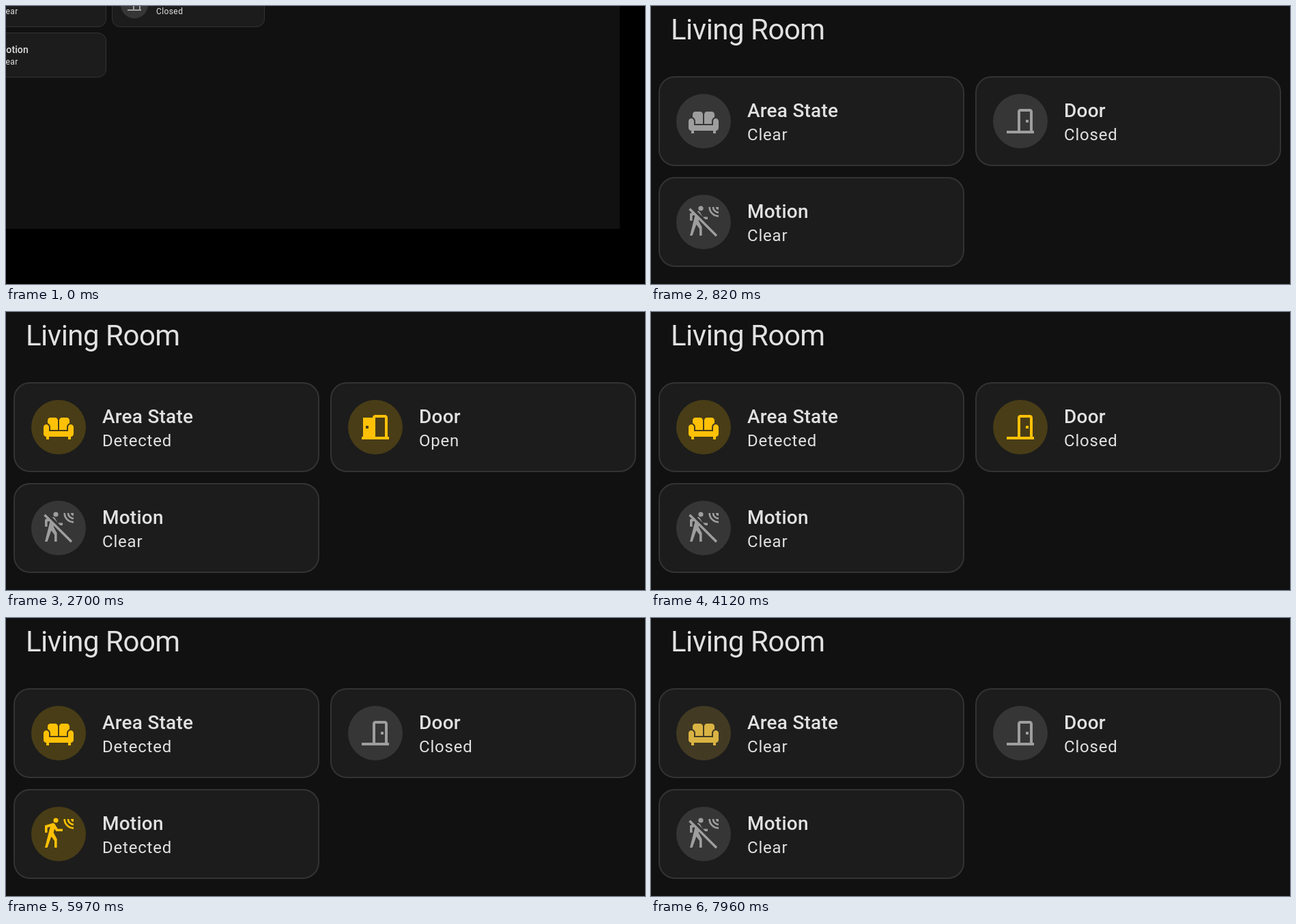
Animation of 936x408 px, one loop 8 s. Source, as an HTML page:

```html
<!DOCTYPE html>
<html lang="en">
<head>
<meta charset="utf-8">
<title>Living Room</title>
<style>
  html, body { margin: 0; width: 100%; height: 100%; overflow: hidden; background: #000; }
  svg { display: block; width: 936px; height: 408px; font-family: Roboto, Arial, sans-serif; }
  text { fill: #e1e1e1; }
  .title { font-size: 42px; letter-spacing: -0.012em; }
  .name { font-size: 28px; font-weight: 500; letter-spacing: .2px; }
  .state { font-size: 24px; letter-spacing: .8px; }
  .card { fill: #1c1c1c; stroke: #333; stroke-width: 2; }
</style>
</head>
<body>
<svg viewBox="0 0 936 408">
  <rect id="panel" fill="#111"/>
  <g id="page"><text class="title" x="29" y="49">Living Room</text></g>
</svg>
<script>
const LOOP = 8000, ZOOM_AT = 100, FADE = 180;
const GREY = [158, 158, 158], AMBER = [255, 193, 7];

const sofa = 'M12.5 7C12.5 5.89 13.39 5 14.5 5H18C19.1 5 20 5.9 20 7V9.16C18.84 9.57 18 10.67 18 11.97V14H12.5V7M6 11.96V14H11.5V7C11.5 5.89 10.61 5 9.5 5H6C4.9 5 4 5.9 4 7V9.15C5.16 9.56 6 10.67 6 11.96M20.66 10.03C19.68 10.19 19 11.12 19 12.12V15H5V12C5 10.9 4.11 10 3 10S1 10.9 1 12V17C1 18.1 1.9 19 3 19V21H5V19H19V21H21V19C22.1 19 23 18.1 23 17V12C23 10.79 21.91 9.82 20.66 10.03Z';
const doorClosed = 'M16 11H18V13H16V11M12 3H19C20.11 3 21 3.89 21 5V19H22V21H2V19H10V5C10 3.89 10.89 3 12 3M12 5V19H19V5H12Z';
const doorOpen = 'M12 3C10.89 3 10 3.89 10 5H3V19H2V21H22V19H21V5C21 3.89 20.11 3 19 3H12M12 5H19V19H12V5M5 11H7V13H5V11Z';
const headAndWaves = 'M10 .2A1.8 1.8 0 0 0 10 3.8A1.8 1.8 0 0 0 10 .2M15.67 1A7.33 7.33 0 0 0 23 8.33V7A6 6 0 0 1 17 1ZM18.33 1A4.67 4.67 0 0 0 23 5.67V4.33A3.33 3.33 0 0 1 19.67 1ZM21 1A2 2 0 0 0 23 3V1Z';
const walker = headAndWaves + 'M7.92 4.03C7.75 4.03 7.58 4.06 7.42 4.11L2 5.8V11H3.8V7.33L5.91 6.67L2 22H3.8L6.67 13.89L9 17V22H10.8V15.59L8.31 11.05L9.04 8.18L10.12 10H15V8.2H11.38L9.38 4.87C9.08 4.37 8.54 4.03 7.92 4.03Z';
const walkerOff = headAndWaves + 'M15 10V8.2H11.38L9.38 4.87C9.08 4.37 8.54 4.03 7.92 4.03C7.7 4.03 7.5 4.06 7.3 4.14L13.2 10ZM2.39 1.73L1.11 3L3.4 5.3L2 5.8V11H3.8V7.33L5 6.95L5.65 7.55L2 22H3.8L6.67 13.89L9 17V22H10.8V15.59L8.31 11.05L8.5 10.37L20.84 22.73L22.11 21.46Z';

// spans: [time switched on, time switched off]
const cards = [
  { x: 11, y: 103, name: 'Area State', labels: ['Clear', 'Detected'], icons: [sofa, sofa],
    spans: [[2520, 4240], [5790, 7890]] },
  { x: 475, y: 103, name: 'Door', labels: ['Closed', 'Open'], icons: [doorClosed, doorOpen],
    spans: [[2480, 4120]] },
  { x: 11, y: 251, name: 'Motion', labels: ['Clear', 'Detected'], icons: [walkerOff, walker],
    spans: [[5760, 7720]] }
];

const panel = document.getElementById('panel');
const page = document.getElementById('page');

function add(parent, tag, attrs, text = '') {
  const node = document.createElementNS('http://www.w3.org/2000/svg', tag);
  for (const key in attrs) node.setAttribute(key, attrs[key]);
  node.textContent = text;
  return parent.appendChild(node);
}

for (const card of cards) {
  const g = add(page, 'g', { transform: `translate(${card.x} ${card.y})` });
  add(g, 'rect', { class: 'card', x: 1, y: 1, width: 446, height: 130, rx: 23 });
  card.badge = add(g, 'g', {});
  add(card.badge, 'circle', { cx: 66, cy: 66, r: 40, opacity: .2 });
  card.icon = add(card.badge, 'path', { transform: 'translate(42 42) scale(2)' });
  add(g, 'text', { class: 'name', x: 130, y: 60 }, card.name);
  card.state = add(g, 'text', { class: 'state', x: 130, y: 94 });
}

const ramp = t => Math.min(1, Math.max(0, t / FADE));

function drawCard(card, t) {
  let on = 0, glow = 0;
  for (const [start, end] of card.spans) {
    if (t >= start && t < end) on = 1;
    glow += ramp(t - start) - ramp(t - end);
  }
  const color = GREY.map((c, i) => Math.round(c + (AMBER[i] - c) * glow));
  card.badge.setAttribute('fill', `rgb(${color})`);
  card.icon.setAttribute('d', card.icons[on]);
  card.state.textContent = card.labels[on];
}

function draw(now) {
  const t = now % LOOP, zoomed = t >= ZOOM_AT;
  panel.setAttribute('width', zoomed ? 936 : 899);
  panel.setAttribute('height', zoomed ? 408 : 327);
  page.setAttribute('transform', zoomed ? '' : 'translate(-82.5 -86.5) scale(.5)');
  for (const card of cards) drawCard(card, t);
}

const begin = performance.now();
function tick() {
  draw(performance.now() - begin);
  requestAnimationFrame(tick);
}
tick();
</script>
</body>
</html>
```
